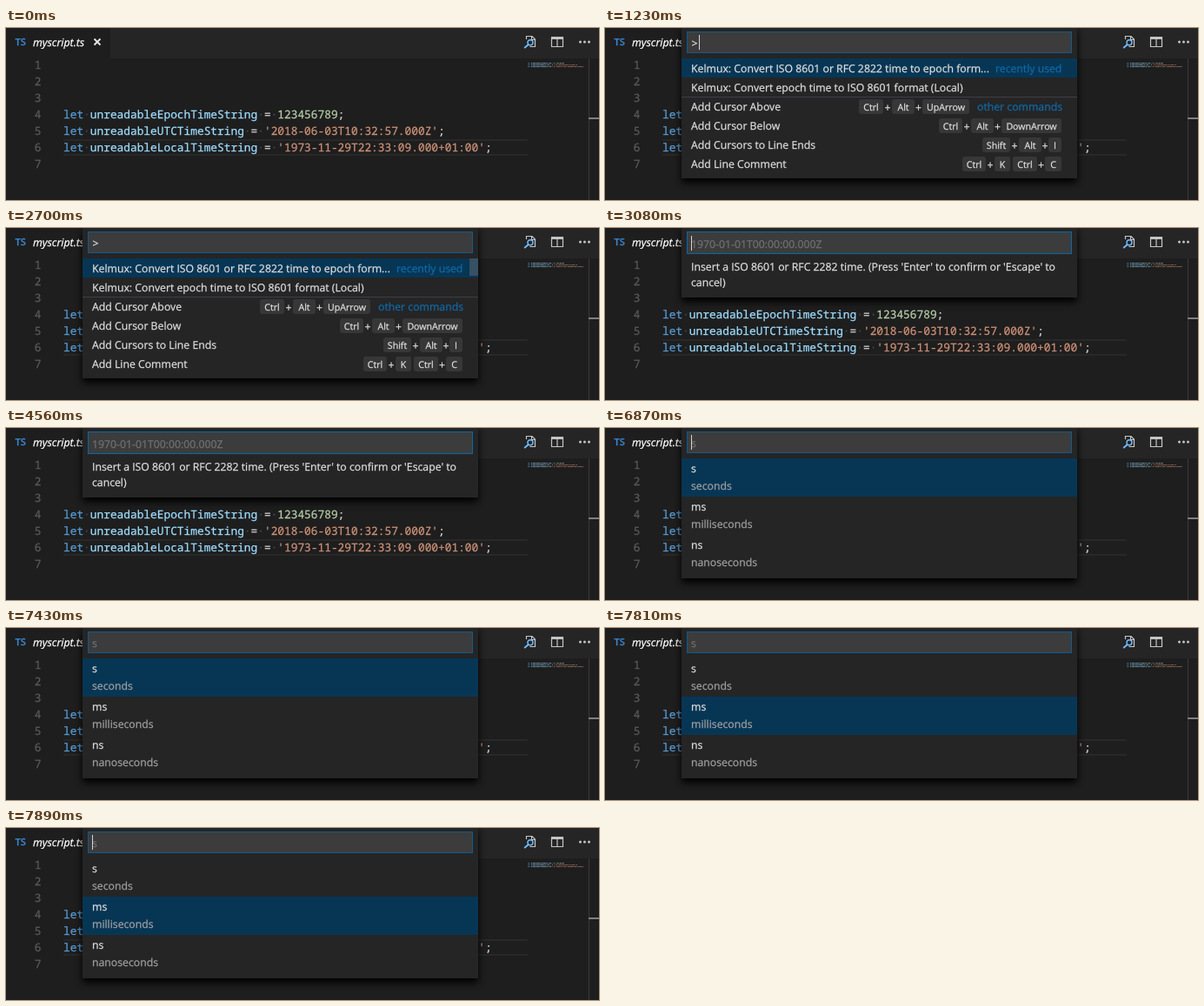
Recreate the animation shown at these times as an HTML page. Size 682 by 198 pixels, loop 8 s.

```html
<!DOCTYPE html>
<html lang="en">
<head>
<meta charset="utf-8">
<title>Editor command palette</title>
<style>
  html, body { margin: 0; width: 100%; height: 100%; overflow: hidden; background: #1e1e1e; }
  svg { display: block; width: 682px; height: 198px; }
  text { white-space: pre; text-rendering: geometricPrecision; }
  text, tspan { fill: var(--ink); stroke: var(--ink); stroke-width: .25px; }
  .ui { font: 12.25px "Open Sans", "Noto Sans", sans-serif; --ink: #dedede; }
  .code { font: 12.83px "Noto Sans Mono", "DejaVu Sans Mono", monospace; --ink: #d4d4d4; }
  .number { --ink: #5a5a5a; text-anchor: end; }
  .tab { font-size: 12.4px; font-style: italic; --ink: #fff; }
  .badge { font-size: 11.2px; font-weight: 600; --ink: #3a85d0; }
  .hint { --ink: #707070; }
  .detail { --ink: #a0a0a0; }
  .group { --ink: #106aa8; }
  .plus { text-anchor: middle; }
  .key { font-size: 10.6px; text-anchor: middle; }
  .panel { filter: drop-shadow(0 5px 4px #000); }
</style>
</head>
<body>
<svg id="stage" viewBox="0 0 682 198"></svg>
<script>
const LOOP = 8000;
const COLORS = { k: '#569cd6', v: '#9cdcfe', o: '#d4d4d4', n: '#b5cea8', s: '#ce9178' };

const rect = (x, y, w, h, fill, extra = '') =>
  `<rect x="${x}" y="${y}" width="${w}" height="${h}" fill="${fill}" ${extra}/>`;
const text = (x, y, content, cls = '') => `<text x="${x}" y="${y}" class="ui ${cls}">${content}</text>`;
const path = (d, stroke, width = 1) =>
  `<path d="${d}" fill="none" stroke="${stroke}" stroke-width="${width}"/>`;

// Wraps content that is visible only within the given [start, end] spans.
const during = (spans, content) => `<g data-spans="${JSON.stringify(spans)}">${content}</g>`;
const caret = (x, y, ...spans) => during(spans, rect(x, y, 1, 17, '#d4d4d4'));

const declaration = (name, kind, value) =>
  [['k', 'let'], ['o', ' '], ['v', name], ['o', ' = '], [kind, value], ['o', ';']];
const program = [
  declaration('unreadableEpochTimeString', 'n', '123456789'),
  declaration('unreadableUTCTimeString', 's', "'2018-06-03T10:32:57.000Z'"),
  declaration('unreadableLocalTimeString', 's', "'1973-11-29T22:33:09.000+01:00'")
];

function codeLine(tokens, row) {
  const spans = tokens.map(([kind, s]) => `<tspan style="--ink: ${COLORS[kind]}">` +
    s.replaceAll(' ', '<tspan style="--ink: #454545">·</tspan>') + '</tspan>').join('');
  return `<text class="code" x="66" y="${104 + row * 19}">${spans}</text>`;
}

function minimapLine(tokens, row) {
  let x = 600, out = '';
  for (const [kind, s] of tokens) {
    for (const c of s) {
      const alpha = 0.2 + (c.charCodeAt(0) * 7 % 10) / 18;
      if (c !== ' ') out += rect(x, 40 + row * 2, 1, 1, COLORS[kind], `opacity="${alpha.toFixed(2)}"`);
      x++;
    }
  }
  return out;
}

function toolbar() {
  const dots = [660.5, 665.5, 670.5].map(x => `<circle cx="${x}" cy="16" r="1.5" fill="#c5c5c5"/>`).join('');
  return path('M598.5 13v-3.5h6.5l3.5 3.5v8.5h-6M604.5 9.5v4h4', '#c5c5c5', 1.2) +
    '<circle cx="603" cy="16.8" r="3" fill="none" stroke="#75beff" stroke-width="1.4"/>' +
    path('M600.8 19l-4.6 4', '#75beff', 1.8) +
    path('M627.5 11h13v10.5h-13zM634 11v10.5', '#c5c5c5', 1.2) +
    rect(627, 10, 14, 3, '#c5c5c5') + dots;
}

function editor() {
  const numbers = Array.from({ length: 7 }, (_, i) =>
    `<text class="code number" x="40.5" y="${47 + i * 19}">${i + 1}</text>`).join('');
  return rect(0, 0, 682, 198, '#1e1e1e') +
    rect(120, 0, 562, 35, '#252526') +
    text(10.5, 19.5, 'TS', 'badge') + text(31, 20.5, 'myscript.ts', 'tab') +
    path('M101.5 12.5l7 7m0-7l-7 7', '#e8e8e8', 1.8) + toolbar() +
    rect(66, 128, 534, 2, '#282828') + rect(66, 145, 534, 2, '#282828') +
    numbers + program.map(codeLine).join('') + program.map(minimapLine).join('') +
    rect(670, 35, 1, 163, '#3a3a3a') + rect(670, 103, 12, 2, '#808080');
}

const panel = (bottom, inputHeight, border) =>
  rect(88, -2, 455, bottom + 2, '#252526', 'class="panel"') +
  rect(94.5, 4.5, 442, inputHeight - 1, '#3c3c3c', `stroke="${border}"`);

// Each key is [left, right, label]; a true fourth entry starts a new chord without a plus sign.
function shortcut(y, keys) {
  return keys.map(([left, right, label, chord], i) => {
    const plus = i && !chord ? text((left + keys[i - 1][1]) / 2, y + 13.5, '+', 'plus') : '';
    return plus + rect(left, y, right - left, 17, '#373738', 'rx="3"') +
      text((left + right) / 2, y + 12.5, label, 'key');
  }).join('');
}

function commandList() {
  const commands = [
    'Kelmux: Convert ISO 8601 or RFC 2822 time to epoch form...',
    'Kelmux: Convert epoch time to ISO 8601 format (Local)',
    'Add Cursor Above', 'Add Cursor Below', 'Add Cursors to Line Ends', 'Add Line Comment'
  ];
  return panel(173, 25, '#115a8c') + text(99.5, 22, '&gt;') +
    rect(88, 35, 455, 22, '#073655') + rect(88, 79, 455, 1, '#3f3f46') +
    commands.map((name, i) => text(99, 51.3 + i * 22, name)).join('') +
    text(449, 51.3, 'recently used', 'group') + text(428, 95.3, 'other commands', 'group') +
    shortcut(82, [[292, 320, 'Ctrl'], [330, 356, 'Alt'], [365, 419, 'UpArrow']]) +
    shortcut(104, [[384, 411, 'Ctrl'], [421, 447, 'Alt'], [456, 525, 'DownArrow']]) +
    shortcut(126, [[434, 466, 'Shift'], [476, 502, 'Alt'], [510, 525, 'I']]) +
    shortcut(148, [[411, 438, 'Ctrl'], [448, 466, 'K'], [469, 497, 'Ctrl', true], [506, 525, 'C']]) +
    during([[1690, 3080]], rect(533, 35, 10, 20, '#355163')) +
    caret(108, 8, [1230, 1690], [2240, 2700]);
}

function timePrompt() {
  return panel(80, 26, '#0b68a6') +
    during([[3080, 5020]], text(99, 22.5, '1970-01-01T00:00:00.000Z', 'hint')) +
    during([[5020, 6870]], text(99, 22.5, '2018-06-03T10:32:57.000Z')) +
    text(99, 48.5, "Insert a ISO 8601 or RFC 2282 time. (Press 'Enter' to confirm or 'Escape' to") +
    text(99, 66.5, 'cancel)') +
    caret(99, 9, [3080, 3640], [4100, 4560]) +
    caret(251, 9, [5020, 5480], [6030, 6490]);
}

function unitList() {
  const units = [['s', 'seconds'], ['ms', 'milliseconds'], ['ns', 'nanoseconds']];
  return panel(173, 25, '#115a8c') + text(99, 21.5, 's', 'hint') +
    during([[6870, 7810]], rect(88, 35, 455, 44, '#073655')) +
    during([[7810, LOOP]], rect(88, 79, 455, 44, '#073655')) +
    units.map(([unit, name], i) =>
      text(99, 50.8 + i * 44, unit) + text(99, 70.8 + i * 44, name, 'detail')).join('') +
    caret(99, 8, [6870, 7430], [7890, LOOP]);
}

const stage = document.getElementById('stage');
stage.innerHTML = editor() +
  during([[1230, 3080]], commandList()) +
  during([[3080, 6870]], timePrompt()) +
  during([[6870, LOOP]], unitList());

const animations = [...stage.querySelectorAll('[data-spans]')].map(el => {
  const frames = [{ offset: 0, opacity: 0, easing: 'step-end' }];
  for (const [start, end] of JSON.parse(el.dataset.spans)) {
    frames.push({ offset: start / LOOP, opacity: 1, easing: 'step-end' });
    frames.push({ offset: end / LOOP, opacity: end === LOOP ? 1 : 0, easing: 'step-end' });
  }
  return el.animate(frames, { duration: LOOP, iterations: Infinity });
});
const now = document.timeline.currentTime;
animations.forEach(animation => { animation.startTime = now; });
</script>
</body>
</html>
```
